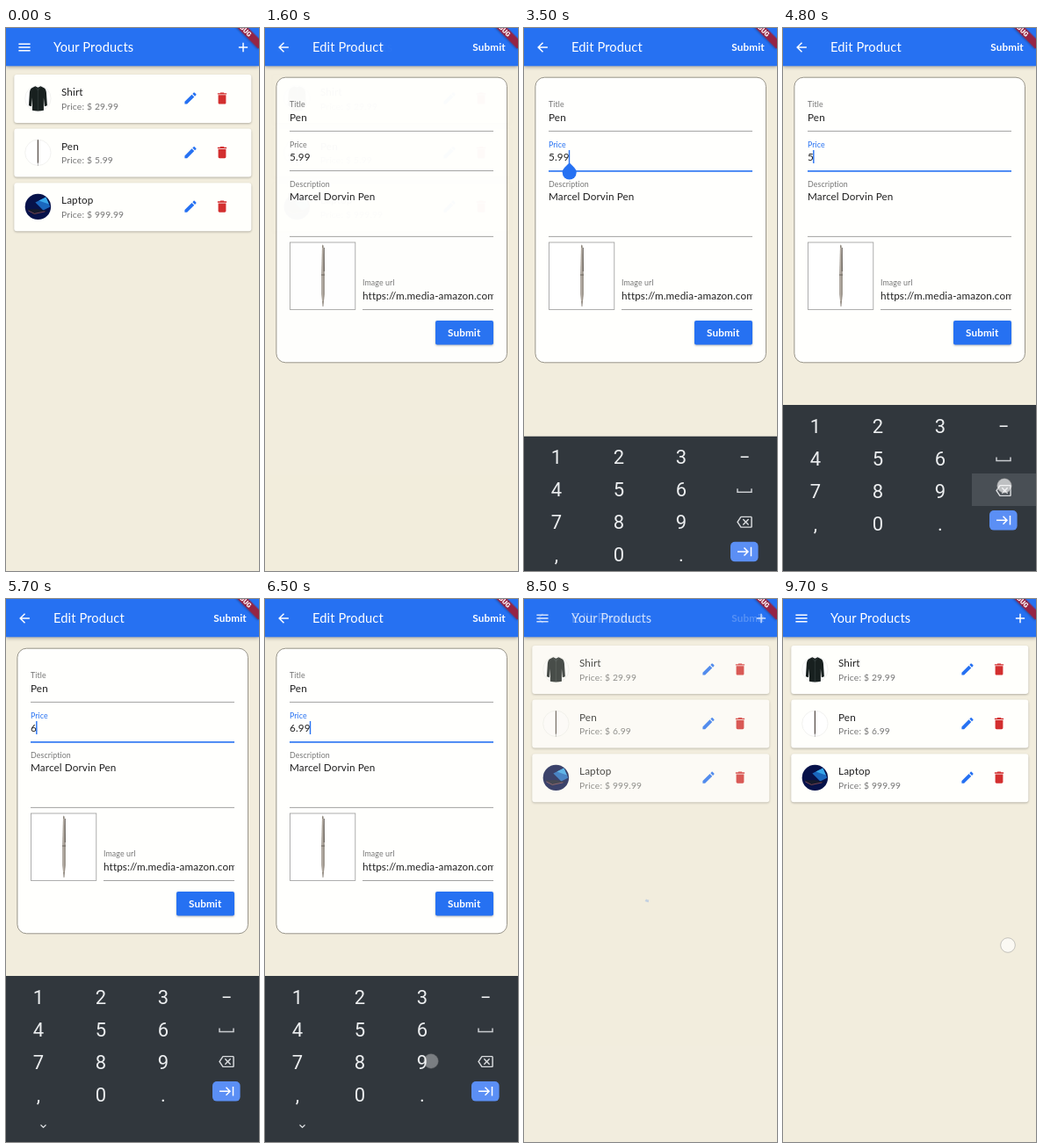
Animation of 288x618 px, one loop 9800 ms. Source, as an HTML page:

```html
<!DOCTYPE html>
<html lang="en">
<head>
<meta charset="utf-8">
<title>Product editor</title>
<style>
  html, body { margin: 0; height: 100%; overflow: hidden; background: #f2eddd; }
  svg { display: block; width: 100vw; height: 100vh; }
  text { font: 11.73px Lato, sans-serif; letter-spacing: .11px; fill: #212121; white-space: pre; }
  .head { font-size: 14.67px; fill: #fff; }
  .sub { font-size: 10.27px; letter-spacing: .18px; fill: #757575; }
  .label { font-size: 8.8px; fill: #757575; }
  .button { font-weight: 700; fill: #fff; }
  .key { font: 22px Roboto, sans-serif; letter-spacing: 0; fill: #eceef0; text-anchor: middle; }
  .debug { font: 900 7.5px Roboto, sans-serif; letter-spacing: 0; fill: #fff; text-anchor: middle; }
  .raised { filter: drop-shadow(0 1px 1px #0004); }
  .bar { filter: drop-shadow(0 1.5px 2px #0005); }
</style>
</head>
<body>
<svg id="stage" viewBox="0 0 288 618"></svg>
<script>
const LOOP = 9800, BLUE = '#2671f2', PAPER = '#f2eddd';
const ICONS = {
  menu: 'M3 18h18v-2H3zm0-5h18v-2H3zm0-7v2h18V6z',
  add: 'M19 13h-6v6h-2v-6H5v-2h6V5h2v6h6z',
  back: 'M20 11H7.83l5.59-5.59L12 4l-8 8 8 8 1.41-1.41L7.83 13H20z',
  edit: 'M3 17.25V21h3.75L17.81 9.94l-3.75-3.75zM20.71 7.04c.39-.39.39-1.02 0-1.41l-2.34-2.34c-.39-.39-1.02-.39-1.41 0l-1.83 1.83 3.75 3.75z',
  trash: 'M6 19c0 1.1.9 2 2 2h8c1.1 0 2-.9 2-2V7H6zM19 4h-3.5l-1-1h-5l-1 1H5v2h14z',
  erase: 'M22 3H7c-.69 0-1.23.35-1.59.88L0 12l5.41 8.11c.36.53.9.89 1.59.89h15c1.1 0 2-.9 2-2V5c0-1.1-.9-2-2-2zm0 16H7.07L2.4 12l4.66-7H22zm-11.59-2L14 13.41 17.59 17 19 15.59 15.41 12 19 8.41 17.59 7 14 10.59 10.41 7 9 8.41 12.59 12 9 15.59z'
};

const icon = (name, x, y, fill = '#fff') =>
  `<path d="${ICONS[name]}" fill="${fill}" fill-rule="evenodd" transform="translate(${x} ${y}) scale(.7334) translate(-12 -12)"/>`;
const text = (s, x, y, cls = '', id = '') => `<text x="${x}" y="${y}" class="${cls}" id="${id}">${s}</text>`;
const rect = (x, y, w, h, fill, more = '') => `<rect x="${x}" y="${y}" width="${w}" height="${h}" fill="${fill}" ${more}/>`;
const rule = (x, y, id = '') => rect(x, y - .4, 260 - x, .8, '#8b8b8b', `id="${id}"`);

// Pictures are drawn around the centre of a round avatar.
const shirt = `<path d="M-3-14L0-12.500 3-14 7-12Q9-11 9.500-7L10.500 8 7.500 9 6.500-1V13.500Q0 15-6.500 13.500V-1L-7.500 9-10.500 8-9.500-7Q-9-11-7-12z" fill="#18201f"/>
  <path d="M0-12V14M-3-13L0-9 3-13" fill="none" stroke="#3a4443" stroke-width=".6"/>`;
const thinPen = `<path d="M0-14.500V12" stroke="#544b45" stroke-width="1.200"/><path d="M0 11V15" stroke="#888" stroke-width=".6"/>`;
const laptop = `<circle r="14.700" fill="#07124a"/>
  <path d="M-3-5L9-11 14 0 6 4z" fill="#1a66bd"/><path d="M1-7L9-11 12.500-3z" fill="#38a6ea"/>
  <path d="M-12 3L-1 2.500 11 5-5 9z" fill="#141a2c"/><path d="M-11 4.500L-4 8 8 5.500" fill="none" stroke="#8a4c62" stroke-width=".8"/>`;

const row = (name, price, picture, i) => `<g transform="translate(0 ${i * 61.6})">
  ${rect(9.3, 53, 270, 55, '#fffffc', 'rx="3" class="raised"')}
  <g transform="translate(36.4 80.200)"><circle r="14.700" fill="#fff" stroke="#ececea" stroke-width=".7"/>${picture}</g>
  ${text(name, 63, 77)}${text('Price: $ ' + price, 63, 92.6, 'sub', 'price' + i)}
  ${icon('edit', 210, 80, BLUE)}${icon('trash', 246, 80, '#d32f2f')}</g>`;

const bigPen = `<path d="M65 248Q65.800 245 66.600 248L67.800 280V303L66.400 317H65.600L64.300 303V280z" fill="#8f877e"/>
  <path d="M65.800 250V311" stroke="#d3ccc3" stroke-width=".8"/><path d="M67.300 250V277" stroke="#5a534d" stroke-width=".9"/>
  <path d="M64 281H68" stroke="#5a534d" stroke-width=".8"/>`;

const form = `${rect(12.9, 56.2, 262.6, 324.6, '#fffffd', 'rx="10.5" stroke="#8d8a7f" stroke-width=".9"')}
  ${text('Title', 28, 90, 'label')}${text('Pen', 28, 105.6)}${rule(28, 117.3)}
  ${text('Price', 28, 135.8, 'label', 'priceLabel')}${text('5.99', 28, 151, '', 'price')}${rule(28, 162.5, 'priceRule')}
  ${rect(0, 139, 1.4, 15, BLUE, 'id="caret"')}
  ${text('Description', 28, 181, 'label')}${text('Marcel Dorvin Pen', 28, 196.4)}${rule(28, 237.3)}
  ${rect(28.4, 244, 74.4, 76.4, '#fff', 'stroke="#9a9a9a" stroke-width=".8"')}${bigPen}
  ${text('Image url', 111, 293.4, 'label')}
  <g clip-path="url(#field)">${text('https://m.media-amazon.com/images', 111, 308.6)}</g>${rule(111, 320.6)}
  ${rect(194, 333, 66, 27.6, BLUE, 'rx="2" class="raised"')}${text('Submit', 208, 351.2, 'button')}
  <path id="handle" d="M51.700 153.200l5.700 5.700a8 8 0 1 1-11.400 0z" fill="${BLUE}"/>`;

const columns = [37, 108, 179, 251];
const keys = ['123−', '456', '789', ',0.'].map((line, r) =>
  [...line].map((c, i) => text(c, columns[i], 460.6 + 37 * r, 'key')).join('')).join('');
const keyboard = `${rect(0, 429, 288, 200, '#31373d')}
  ${rect(215, 507, 73, 37, '#494f55', 'id="pressed"')}${keys}
  <path d="M243 488.500v4h16v-4" fill="none" stroke="#c9ccd0" stroke-width="1.500"/>
  ${icon('erase', 251, 526.5, '#d9dbde')}
  ${rect(235, 549, 31.6, 22.6, '#5b8ff5', 'rx="5"')}
  <path d="M243 560.300h12m-4.500-4.500l4.500 4.500-4.500 4.500M258.500 555v10.600" fill="none" stroke="#fff" stroke-width="1.500"/>
  <path id="chevron" d="M39.500 598.500l3 3 3-3" fill="none" stroke="#e4e6e8" stroke-width="1.200"/>`;

stage.innerHTML = `<clipPath id="field"><path d="M111 296h149v18H111z"/></clipPath>
  ${rect(0, 0, 288, 618, PAPER)}
  <g id="list">${row('Shirt', '29.99', shirt, 0)}${row('Pen', '5.99', thinPen, 1)}${row('Laptop', '999.99', laptop, 2)}</g>
  <g id="editBody">${rect(0, 43, 288, 575, PAPER)}<g id="form">${form}</g>
    <path id="spinner" fill="none" stroke="${BLUE}" stroke-width="2.900"/></g>
  ${rect(0, -5, 288, 48.3, BLUE, 'class="bar"')}
  <g id="listBar">${icon('menu', 21, 22)}${text('Your Products', 54, 27.4, 'head')}${icon('add', 270, 22)}</g>
  <g id="editBar">${icon('back', 21, 22)}${text('Edit Product', 54, 27.4, 'head')}${text('Submit', 236.3, 26.2, 'button')}</g>
  <g transform="translate(269.700 0) rotate(45)">${rect(-29, -4.4, 58, 8.8, '#952444', 'class="raised"')}${text('DEBUG', 0, 2.7, 'debug')}</g>
  <g id="keyboard">${keyboard}</g>
  <circle id="touch" r="8.300" fill="#fff" fill-opacity=".65" stroke="#888" stroke-opacity=".45"/>`;

const $ = id => document.getElementById(id);
const set = (id, attrs) => { for (const k in attrs) $(id).setAttribute(k, attrs[k]); };
const show = (id, on) => set(id, { opacity: +on });
const ramp = (t, from, to) => Math.min(1, Math.max(0, (t - from) / (to - from)));
const easeOut = p => 1 - (1 - p) ** 2;

const FOCUS = 3250, SENT = 8050;
const typing = [[0, '5.99'], [FOCUS, '5.99'], [4350, '5.9'], [4550, '5.'], [4750, '5'], [4980, ''],
  [5450, '6'], [5800, '6.'], [6200, '6.9'], [6450, '6.99']];
// start, end, x, y
const taps = [[1150, 1450, 210, 141], [3080, 3300, 62, 148], [4250, 5050, 252, 521], [5400, 5540, 184, 490],
  [5750, 5890, 182, 563], [6150, 6290, 188, 527], [6400, 6550, 189, 526], [7850, 8050, 227, 347], [8950, 9900, 256, 394]];

function draw(t) {
  const opened = easeOut(ramp(t, 1430, 1630)), closed = easeOut(ramp(t, 8400, 8590));
  const edit = opened * (1 - closed);
  show('editBody', edit);
  show('editBar', edit);
  show('listBar', 1 - edit);
  $('price1').textContent = 'Price: $ ' + (t < SENT ? '5.99' : '6.99');

  const [since, value] = typing.filter(step => step[0] <= t).pop();
  const focused = t >= FOCUS;
  $('price').textContent = value;
  $('priceLabel').style.fill = focused ? BLUE : '';
  set('priceRule', { fill: focused ? BLUE : '#8b8b8b', height: focused ? 1.6 : .8 });
  set('caret', { x: 27.2 + $('price').getComputedTextLength() });
  show('caret', focused && (t - since) % 1000 < 500);
  show('handle', focused && t < 4350);
  show('form', t < SENT);

  const s = t - 8500, from = 1.72 + s * .0047, to = from + .3 + 4.4 * Math.sin(Math.PI * s / 1333) ** 2;
  const at = a => `${144 + 13 * Math.cos(a)} ${331 + 13 * Math.sin(a)}`;
  set('spinner', { d: `M${at(from)}A13 13 0 ${+(to - from > Math.PI)} 1 ${at(to)}` });
  show('spinner', t >= SENT);

  const up = easeOut(ramp(t, 3300, 3655)) - ramp(t, 7200, 7480) ** 2;
  set('keyboard', { transform: `translate(0 ${190 * (1 - up)})` });
  show('pressed', t >= 4250 && t < 5050);
  show('chevron', t >= 4950);

  const tap = taps.find(([a, b]) => t >= a && t < b);
  if (tap) set('touch', { cx: tap[2], cy: tap[3], opacity: Math.min(ramp(t, tap[0] - 40, tap[0] + 40), 1 - ramp(t, tap[1] - 90, tap[1])) });
  else show('touch', false);
}

const start = performance.now();
(function tick() {
  draw((performance.now() - start) % LOOP);
  requestAnimationFrame(tick);
})();
</script>
</body>
</html>
```
